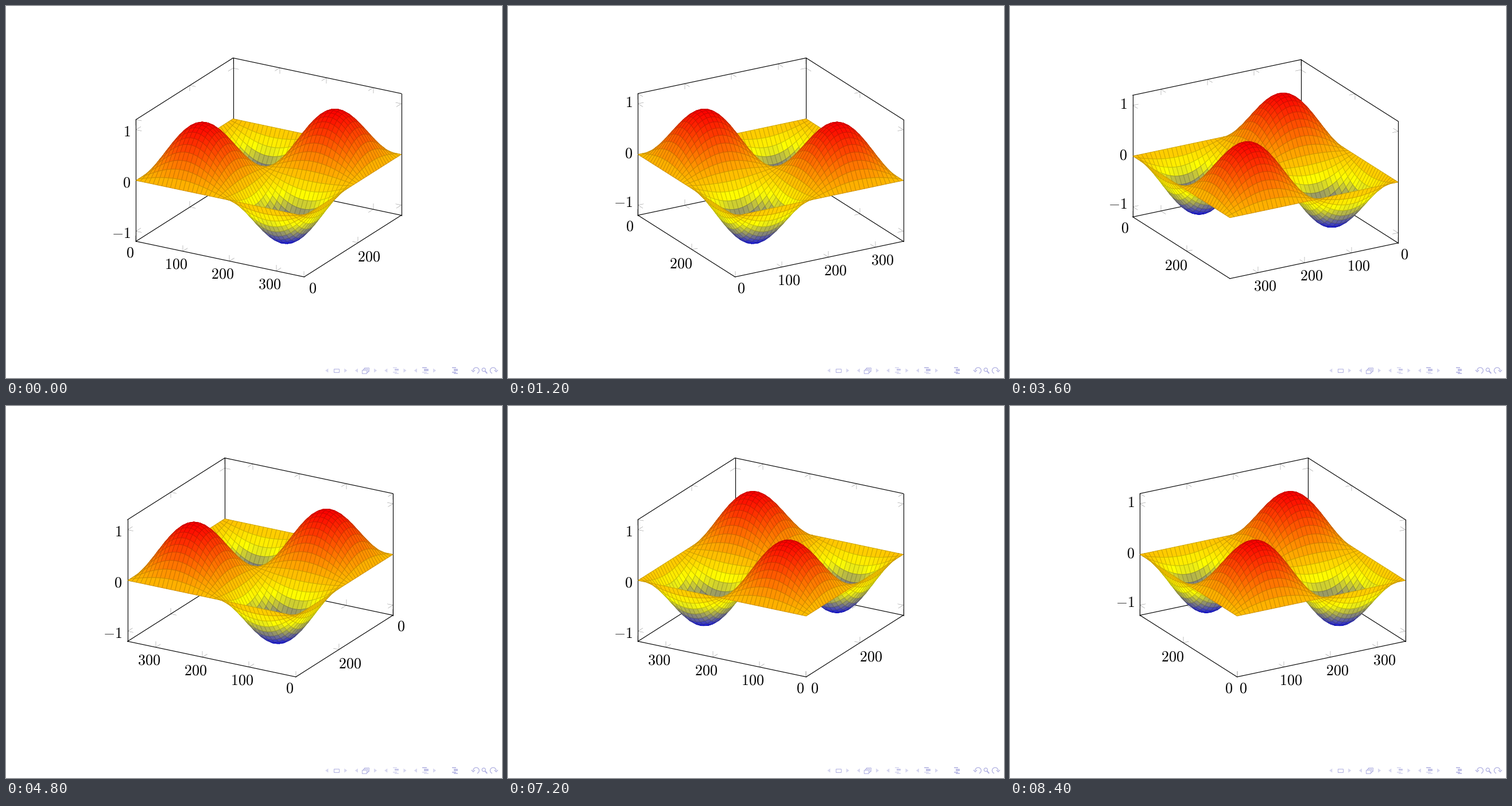
These frames come from a looping animation (864 by 648 pixels, 9.6 s). A matplotlib script:

```python
from itertools import product

import matplotlib.pyplot as plt
import numpy as np
from matplotlib.animation import FuncAnimation
from matplotlib.collections import LineCollection, PolyCollection
from matplotlib.colors import LinearSegmentedColormap
from matplotlib.patches import Arc, Circle, Polygon, Rectangle

W, H = 864, 648
ANGLES = [30, 60, 120, 150, 210, 240, 300, 330]
LEFT = {120: 211.9, 150: 213.9, 210: 211.9, 240: 213.9}
WIDE, TILT, TALL = 338.3, 124.0, 212.0
SAMPLES = 40
TICK = 10.1
PEN, THIN = 0.95, 0.475
DARK, LIGHT = "#adade0", "#d6d6f0"

fig = plt.figure(figsize=(W / 72, H / 72), dpi=72, facecolor="white")
ax = fig.add_axes([0, 0, 1, 1])
ax.set_xlim(0, W)
ax.set_ylim(H, 0)
ax.axis("off")

HOT = LinearSegmentedColormap.from_list(
    "heat", [(0, 0, 1), (1, 1, 0), (1, 0.5, 0), (1, 0, 0)], N=1024)


# ---- surface z = sin x sin y on a regular grid, in box units -0.5..0.5
deg = np.radians(np.linspace(0, 360, SAMPLES))
grid = np.linspace(-0.5, 0.5, SAMPLES)
U, V = np.meshgrid(grid, grid)
Z = np.outer(np.sin(deg), np.sin(deg))


def cells(a):
    """Four corner values of every grid cell."""
    corners = [a[:-1, :-1], a[:-1, 1:], a[1:, 1:], a[1:, :-1]]
    return np.stack([c.ravel() for c in corners], axis=1)


QUADS = np.stack([cells(U), cells(V), cells(Z) / 2.4], axis=2)
level = cells(Z).mean(axis=1) / Z.max()
FILL = HOT((level + 1) / 2)
EDGE = FILL * [0.8, 0.8, 0.8, 1]


class View:
    """Projection of the unit box for one azimuth."""

    def __init__(self, angle):
        a = np.radians(angle)
        c, s = np.cos(a), np.sin(a)
        self.axes = np.array([[WIDE * c, TILT * s],
                              [WIDE * s, -TILT * c],
                              [0, -TALL]])
        half = np.abs(self.axes[:2]).sum(axis=0) / 2
        front = 474.8 if angle in (120, 150) else 471.9
        left = LEFT.get(angle, 226.4)
        self.mid = np.array([left + half[0], front - half[1] - TALL / 2])
        self.near = np.where(self.axes[:2, 1] > 0, 0.5, -0.5)
        self.long = int(abs(s) > abs(c))

    def __call__(self, p):
        return self.mid + np.asarray(p) @ self.axes

    def ticks(self, k):
        if k == 2:
            return [-1, 0, 1]
        return [0, 100, 200, 300] if k == self.long else [0, 200]


def place(k, value):
    return value / 2.4 if k == 2 else value / 360 - 0.5


def box_lines(view):
    """Nine visible box edges and the tick strokes on them."""
    edges, marks = [], []
    for k in range(3):
        others = [j for j in range(3) if j != k]
        for signs in product((-0.5, 0.5), repeat=2):
            p = np.zeros(3)
            p[others] = signs
            top_front = [*view.near, 0.5]
            if all(p[j] == top_front[j] for j in others):
                continue
            a, b = p.copy(), p.copy()
            a[k], b[k] = -0.5, 0.5
            edges.append([view(a), view(b)])
            for value in view.ticks(k):
                q = p.copy()
                q[k] = place(k, value)
                start = view(q)
                for j in others:
                    step = -np.sign(p[j]) * view.axes[j]
                    marks.append([start, start + TICK * step / np.hypot(*step)])
    return edges, marks


def labels(view):
    """Text, anchor and alignment of all nine tick labels."""
    out = []
    for k in (0, 1):
        other = 1 - k
        end = np.zeros(3)
        end[other], end[2] = view.near[other], -0.5
        corner = np.array([*view.near, -0.5])
        side = np.sign(view(end)[0] - view(corner)[0])
        for value in view.ticks(k):
            p = end.copy()
            p[k] = place(k, value)
            if k == view.long:
                dx, dy = (12, 22) if value else (10.8, 19.3)
            else:
                dx, dy = (19, 24) if value else (14.2, 18.7)
            x, y = view(p)
            out.append((rf"$\mathsf{{{value}}}$", x + side * dx, y + dy, "center"))

    walls = [np.array([u, v, 0]) for u, v in product((-0.5, 0.5), repeat=2)]
    post = min(walls, key=lambda p: view(p)[0])
    near_x = view([*view.near, 0])[0]
    low = near_x > view.mid[0]
    for value in view.ticks(2):
        p = post.copy()
        p[2] = place(2, value)
        x, y = view(p)
        y += 3 if low else -3
        if value < 0 and not low:
            y -= 2.2
        sign = "-" if value < 0 else ""
        out.append((rf"${sign}\mathsf{{{abs(value)}}}$", x - 9.6, y, "right"))
    return out


# ---- navigation bar
def stroke(xs, ys, color, lw=PEN):
    ax.plot(xs, ys, color=color, lw=lw, solid_capstyle="butt")


def arrow(x, way, color=LIGHT):
    ax.add_patch(Polygon([(x - 2.5 * way, 631.4), (x + 2.5 * way, 635),
                          (x - 2.5 * way, 638.6)], fc=color, ec="none"))


def frame_icon(x, y, w, h):
    ax.add_patch(Rectangle((x, y), w, h, fc="white", ec=DARK, lw=PEN))


def list_icon(x, dark_rows):
    for i, indent in enumerate([0, 3, 3, 0, 3]):
        y = 630 + 2.6 * i
        color = DARK if i in dark_rows else LIGHT
        stroke([x + indent, x + indent + 7.6], [y, y], color, 1.5)


def turn_icon(x, way):
    start, stop = (-70, 180) if way < 0 else (0, 250)
    # the y axis points down, so angles are mirrored
    ax.add_patch(Arc((x, 635), 10.4, 10.4, theta1=-stop, theta2=-start,
                     ec=DARK, lw=1.2))
    tip = x + way * 5.2
    stroke([tip - 3, tip, tip + 3], [634, 637.4, 634], DARK, 1.2)


def nav_bar():
    for x in (558.8, 610.4, 661.8, 713.4):
        arrow(x, -1)
    for x in (591.8, 643.6, 695, 746.6):
        arrow(x, 1)
    frame_icon(570.8, 632, 9, 6.2)
    for i in (2, 1, 0):
        frame_icon(619.6 + 2 * i, 633.8 - 2 * i, 8.6, 6.2)
    list_icon(673.5, {1})
    list_icon(725.2, {0, 1, 2})
    list_icon(776.8, set(range(5)))
    turn_icon(819, -1)
    ax.add_patch(Circle((832.2, 633.6), 3, fc="none", ec=DARK, lw=1.2))
    stroke([834.3, 838.2], [635.8, 640], DARK, 1.9)
    turn_icon(848.6, 1)


nav_bar()
marks = ax.add_collection(LineCollection([], colors="gray", lw=THIN, zorder=2))
edges = ax.add_collection(LineCollection([], colors="black", lw=1.15, zorder=3,
                                         capstyle="projecting"))
mesh = ax.add_collection(PolyCollection([], lw=PEN, zorder=4, joinstyle="round"))
texts = [ax.text(0, 0, "", size=26, va="baseline", math_fontfamily="cm", zorder=5)
         for _ in range(9)]


def draw(i):
    view = View(ANGLES[i])
    lines, strokes = box_lines(view)
    edges.set_segments(lines)
    marks.set_segments(strokes)

    depth = QUADS[:, :, :2].mean(axis=1) @ view.axes[:2, 1]
    order = np.argsort(depth, kind="stable")
    mesh.set_verts(view(QUADS[order]))
    mesh.set_facecolor(FILL[order])
    mesh.set_edgecolor(EDGE[order])

    for t, (s, x, y, align) in zip(texts, labels(view)):
        t.set_text(s)
        t.set_position((x, y + 8.6))
        t.set_ha(align)
    return [marks, edges, mesh, *texts]


anim = FuncAnimation(fig, draw, frames=len(ANGLES), interval=1200,
                     repeat=True, repeat_delay=0)
plt.show()
```
